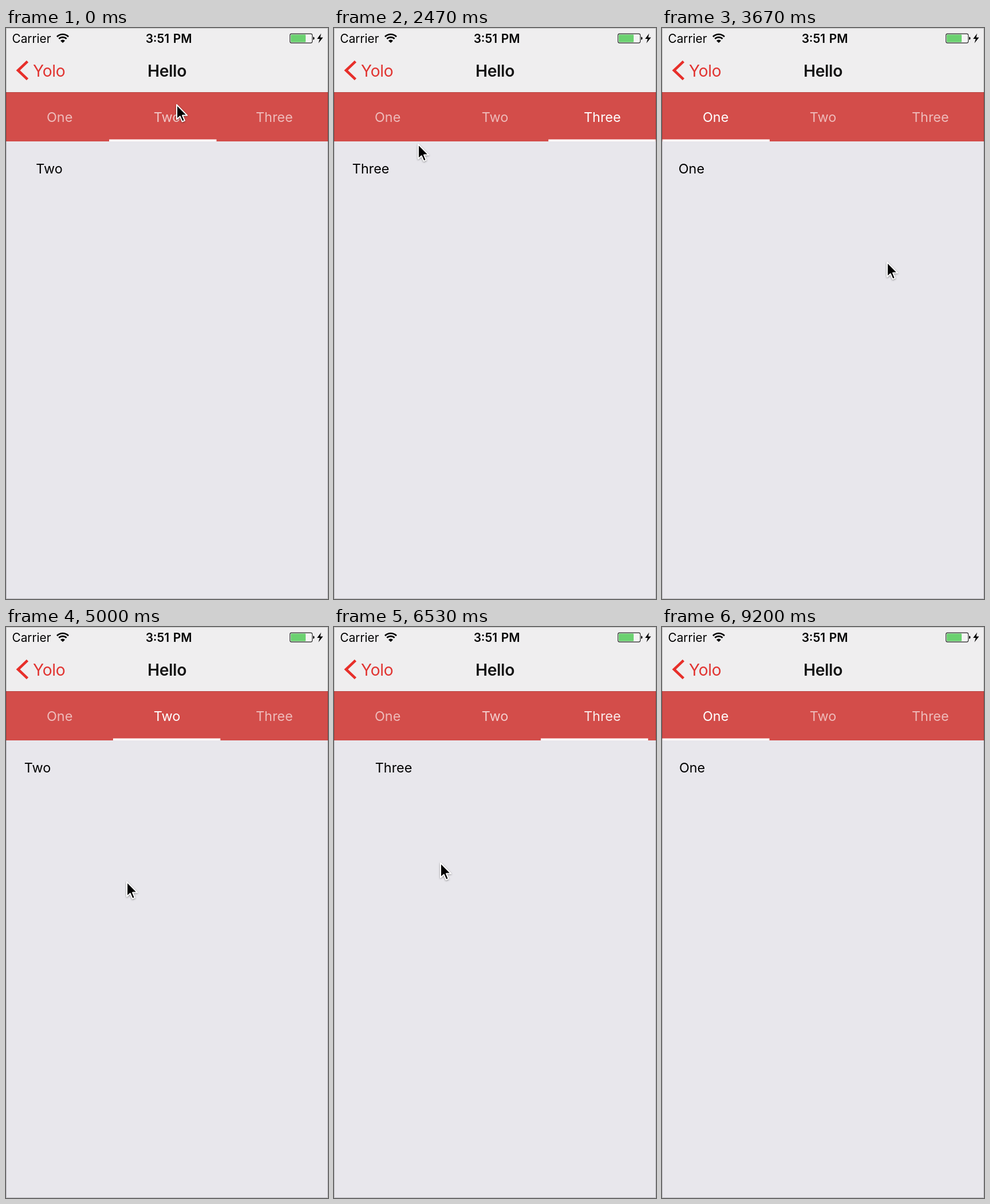
Write an HTML page that moves like this. It is 562 px wide and 997 px high and loops after 9.39 s.

```html
<!DOCTYPE html>
<html lang="en">
<head>
<meta charset="utf-8">
<title>Tab pager</title>
<style>
  html, body { margin: 0; height: 100%; overflow: hidden; background: #e8e7ec; }
  svg { display: block; width: 562px; height: 997px; }
  text { font: 23.4px Inter, Roboto, sans-serif; }
  .status { font-size: 20.8px; }
  .nav { font-size: 28.2px; letter-spacing: -.3px; }
  .bold { font-weight: 600; }
  .mid { text-anchor: middle; }
</style>
</head>
<body>
<svg viewBox="0 0 562 997">
  <rect width="562" height="997" fill="#e8e7ec"/>
  <rect width="562" height="112" fill="#efeeef"/>

  <text class="status" x="10.5" y="26">Carrier</text>
  <path d="M89 15.2a14 14 0 0 1 20 0M92.4 18.9a9.2 9.2 0 0 1 13.2 0" fill="none" stroke="#000" stroke-width="2.7"/>
  <path d="M95 22.2a5.6 5.6 0 0 1 8 0L99 26z"/>
  <text class="status bold mid" x="284" y="26" word-spacing="1.5">3:51 PM</text>
  <rect x="495.6" y="10.1" width="39" height="16" rx="2.8" fill="#f3f3f3" stroke="#222" stroke-width="1.1"/>
  <rect x="497" y="11.5" width="26" height="13.2" rx="1" fill="#6bd170"/>
  <path d="M536 15.2q2.4.6 2.4 2.8t-2.4 2.8z"/>
  <path d="M550 9.5L543 19h4.6l-2.3 7.5 8-10h-4.9z"/>

  <path d="M37.5 58.3L21 74l16.5 15.7" fill="none" stroke="#e72f2a" stroke-width="4.6"/>
  <text class="nav" x="47" y="85" fill="#e13431">Yolo</text>
  <text class="nav bold mid" x="281" y="85" fill="#151515">Hello</text>

  <rect y="112" width="562" height="86" fill="#d34d4a"/>
  <rect y="112" width="562" height="1" fill-opacity=".12"/>
  <g id="tabs"></g>
  <rect id="bar" y="194.5" width="187.3" height="3.5" fill="#fff"/>
  <g id="pages"></g>

  <rect x=".5" y=".5" width="561" height="996" fill="none" stroke="#000" stroke-opacity=".2"/>
  <path id="cursor" d="M0 0V25.5L5.7 20.2 9.6 29.4 13.8 27.6 10 18.6H18.2z"
    stroke="#fff" stroke-width="2" stroke-linejoin="round"
    style="filter:drop-shadow(0 1.5px 1.5px #0006)"/>
</svg>
<script>
const LOOP = 9390, WIDTH = 562, TAB = WIDTH / 3;
const TRAVEL = 300;   // longest time the pointer takes between two stops
const names = ['One', 'Two', 'Three'];
const $ = id => document.getElementById(id);

function addText(parent, label, attrs) {
  const el = document.createElementNS('http://www.w3.org/2000/svg', 'text');
  el.textContent = label;
  for (const key in attrs) el.setAttribute(key, attrs[key]);
  return parent.appendChild(el);
}
const tabs = names.map((n, i) =>
  addText($('tabs'), n, { class: 'mid', x: TAB * (i + .5), y: 164, fill: '#fff' }));
const pages = names.map(n => addText($('pages'), n, { y: 253.5 }));

// Each gesture is released at a time and settles on a page.
const gestures = [
  { at: -560, to: 1 },
  { at: 1550, to: 2 },
  { at: 2700, to: 0 },
  { at: 4600, to: 1, swipe: true },
  { at: 6360, to: 2, swipe: true },
  { at: 8100, to: 0 }
];
gestures.forEach((g, i) => {
  g.from = gestures.at(i - 1).to;
  g.start = g.swipe ? g.at - TRAVEL : g.at;
});

// Pointer stops: arrival time, x, y
const stops = [
  [0, 298, 134], [900, 455, 150], [2470, 147, 203], [2660, 104, 160],
  [3670, 393, 409], [4200, 460, 421], [4600, 211, 445],
  [5670, 498, 405], [6360, 186, 412], [7900, 147, 166], [8900, 150, -40]
];

const clamp = v => Math.max(0, Math.min(1, v));
const smooth = v => v * v * (3 - 2 * v);
const mix = (a, b, v) => a + (b - a) * v;
const spring = x => (1 + x) * Math.exp(-x);   // critically damped

function pointer(t) {
  const i = stops.findIndex(s => s[0] > t);
  if (i < 0) return stops.at(-1).slice(1);
  const [t0, x0, y0] = stops[i - 1], [t1, x1, y1] = stops[i];
  const v = smooth(clamp(1 - (t1 - t) / Math.min(TRAVEL, t1 - t0)));
  return [mix(x0, x1, v), mix(y0, y1, v)];
}

// A swiped page follows the pointer until release, then springs into place.
function pagePosition({ start, at, from, to, swipe }, t) {
  const dragged = swipe ? (pointer(start)[0] - pointer(Math.min(t, at))[0]) / WIDTH : 0;
  const age = Math.max(0, t - at);
  return mix(to, from + dragged, spring(age * (swipe ? .019 : .009)));
}

function draw(t) {
  const g = gestures.findLast(g => g.start <= t);
  const pos = pagePosition(g, t);
  const fade = age => clamp(age / 240);
  const lit = {
    [g.from]: 1 - fade(t - g.at),
    [g.to]: fade(t - g.at - (g.swipe ? 0 : 520))
  };

  $('bar').setAttribute('x', pos * TAB);
  names.forEach((_, i) => {
    tabs[i].setAttribute('fill-opacity', mix(.62, 1, lit[i] || 0));
    pages[i].setAttribute('x', 30.5 + (i - pos) * WIDTH);
  });
  $('cursor').setAttribute('transform', `translate(${pointer(t)})`);
}

const began = performance.now();
function tick() {
  draw((performance.now() - began) % LOOP);
  requestAnimationFrame(tick);
}
tick();
</script>
</body>
</html>
```
